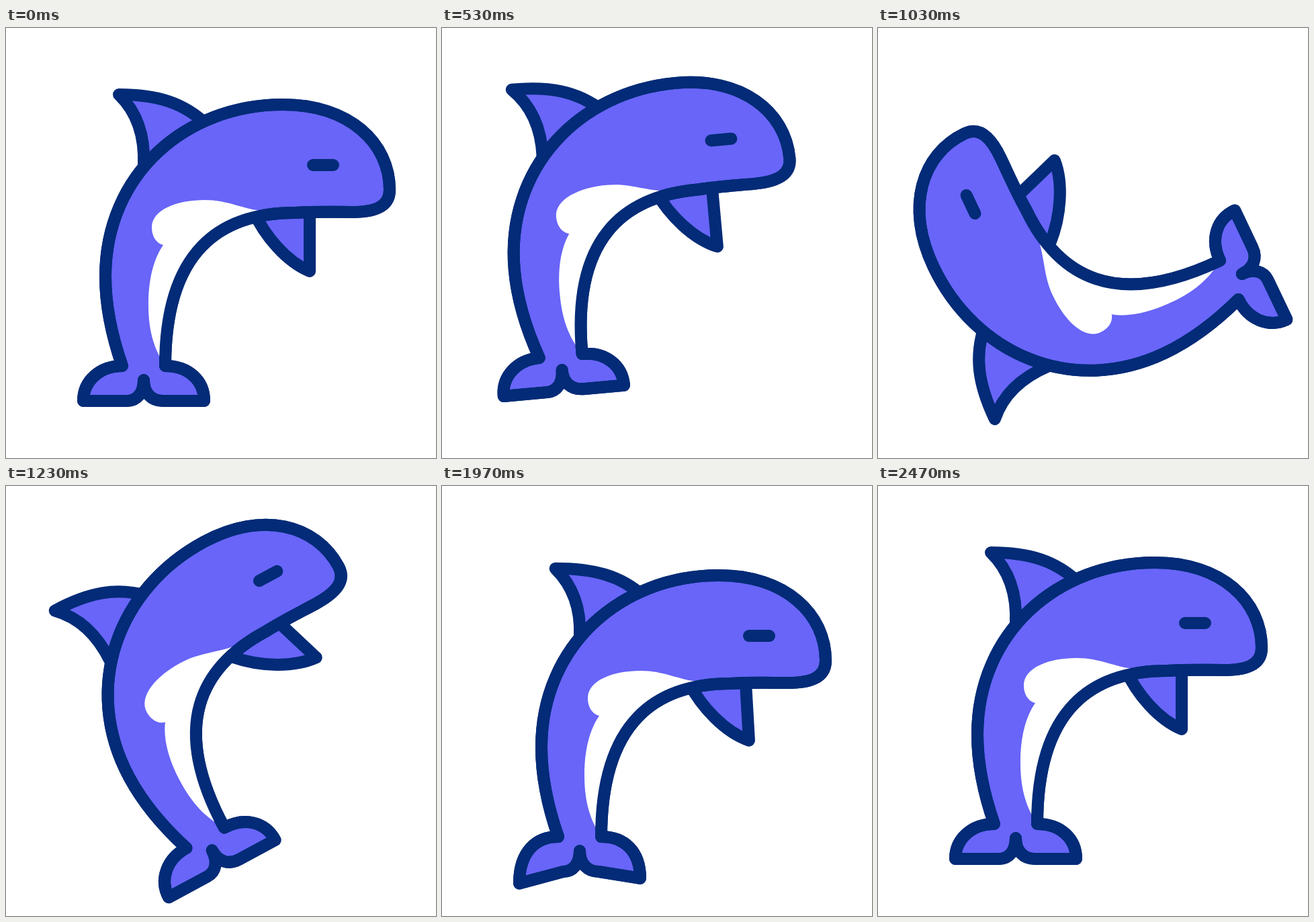
These frames come from a looping animation (640 px wide and 640 px high, 2.8 s). An HTML page with a canvas:

```html
<!DOCTYPE html>
<html lang="en">
<head>
<meta charset="utf-8">
<title>Leaping dolphin</title>
<style>
  html, body { margin: 0; width: 100%; height: 100%; overflow: hidden; background: #fff; }
  canvas { display: block; width: 100%; height: 100%; }
</style>
</head>
<body>
<canvas id="stage" width="640" height="640"></canvas>
<script>
const ctx = document.getElementById('stage').getContext('2d');
const LOOP = 2800;
const BLUE = '#6865f8', NAVY = '#032b77', WHITE = '#fff';
const PIVOT = { x: 345, y: 344 };
const SHOULDER = { x: 412, y: 275 };

// Sine ease from 0 to 1 between two times.
const ease = (t, start, end) => {
  const u = Math.min(1, Math.max(0, (t - start) / (end - start)));
  return (1 - Math.cos(Math.PI * u)) / 2;
};

// Eases up to 1 at the peak, then back to 0.
const bump = (t, start, peak, end) => ease(t, start, peak) - ease(t, peak, end);

// Lean back, somersault clockwise, land low, then float up with trailing fins.
const pose = t => ({
  spin: -25 * ease(t, 0, 380) + 385 * ease(t, 381, 1411),
  x: -57 * ease(t, 0, 380) + 30 * ease(t, 380, 700) + 27 * ease(t, 1000, 1250),
  y: -27 * ease(t, 0, 450) + 55 * ease(t, 1210, 1590) - 28 * ease(t, 1780, 2280),
  dorsal: 3 * bump(t, 0, 450, 830) + 16 * bump(t, 1230, 1570, 2200),
  flipper: -18.5 * (ease(t, 530, 800) - ease(t, 1230, 1480))
    + 6 * bump(t, 1380, 1570, 1800) - 3.3 * bump(t, 1750, 1970, 2300),
  leftFluke: -5 * bump(t, 1450, 1600, 1850) + 30 * bump(t, 1800, 2110, 2470),
  rightFluke: -15 * bump(t, 1400, 1570, 1850) + 29 * bump(t, 1860, 2140, 2470)
});

const UNDERSIDE = 'L430 275 C318 275 237 332 237 503';
const belly = new Path2D(`M237 503 C218 475 212 445 212 412 C212 375 219 345 234 323
  C222 320 217 308 217 297 C217 270 255 256 296 256 C330 256 350 269 385 273
  ${UNDERSIDE} Z`);
const flipper = new Path2D('M368 272 C385 310 418 348 452 362 L452 270');
const eye = new Path2D('M457 204 H487');

const bodyPath = (left, right) => new Path2D(`M173 503
  C158 460 148 415 148 370 C148 217 268 114 412 114
  C511 114 571 171 571 241 C571 266 549 274 515 274 C485 274 460 273 430 275
  ${UNDERSIDE}
  C272 503 295 525 295 ${555 + right} L234 555 C216 555 205 543 205 524
  C205 543 195 555 180 555 L115 ${555 + left} C115 525 140 503 173 503 Z`);

function dorsalPath(drop) {
  const x = 168 + drop / 8, y = 99 + drop;
  return new Path2D(`M300 145 C265 ${111 + drop * 0.6} 225 ${y} ${x} ${y}
    C195 ${125 + drop} 207 ${160 + drop / 2} 205 205`);
}

function paint(path, fill) {
  ctx.fillStyle = fill;
  ctx.fill(path);
  ctx.stroke(path);
}

function turnAbout(point, degrees) {
  ctx.translate(point.x, point.y);
  ctx.rotate(degrees * Math.PI / 180);
  ctx.translate(-point.x, -point.y);
}

function draw(t) {
  const p = pose(t);
  ctx.fillStyle = WHITE;
  ctx.fillRect(0, 0, 640, 640);
  ctx.save();
  ctx.translate(p.x, p.y);
  turnAbout(PIVOT, p.spin);
  ctx.strokeStyle = NAVY;
  ctx.lineWidth = 18;
  ctx.lineCap = ctx.lineJoin = 'round';

  paint(dorsalPath(p.dorsal), BLUE);

  ctx.save();
  turnAbout(SHOULDER, p.flipper);
  paint(flipper, BLUE);
  ctx.restore();

  const body = bodyPath(p.leftFluke, p.rightFluke);
  paint(body, BLUE);
  ctx.fillStyle = WHITE;
  ctx.fill(belly);
  ctx.stroke(body);
  ctx.stroke(eye);
  ctx.restore();
}

const start = performance.now();
function tick() {
  draw((performance.now() - start) % LOOP);
  requestAnimationFrame(tick);
}
tick();
</script>
</body>
</html>
```
